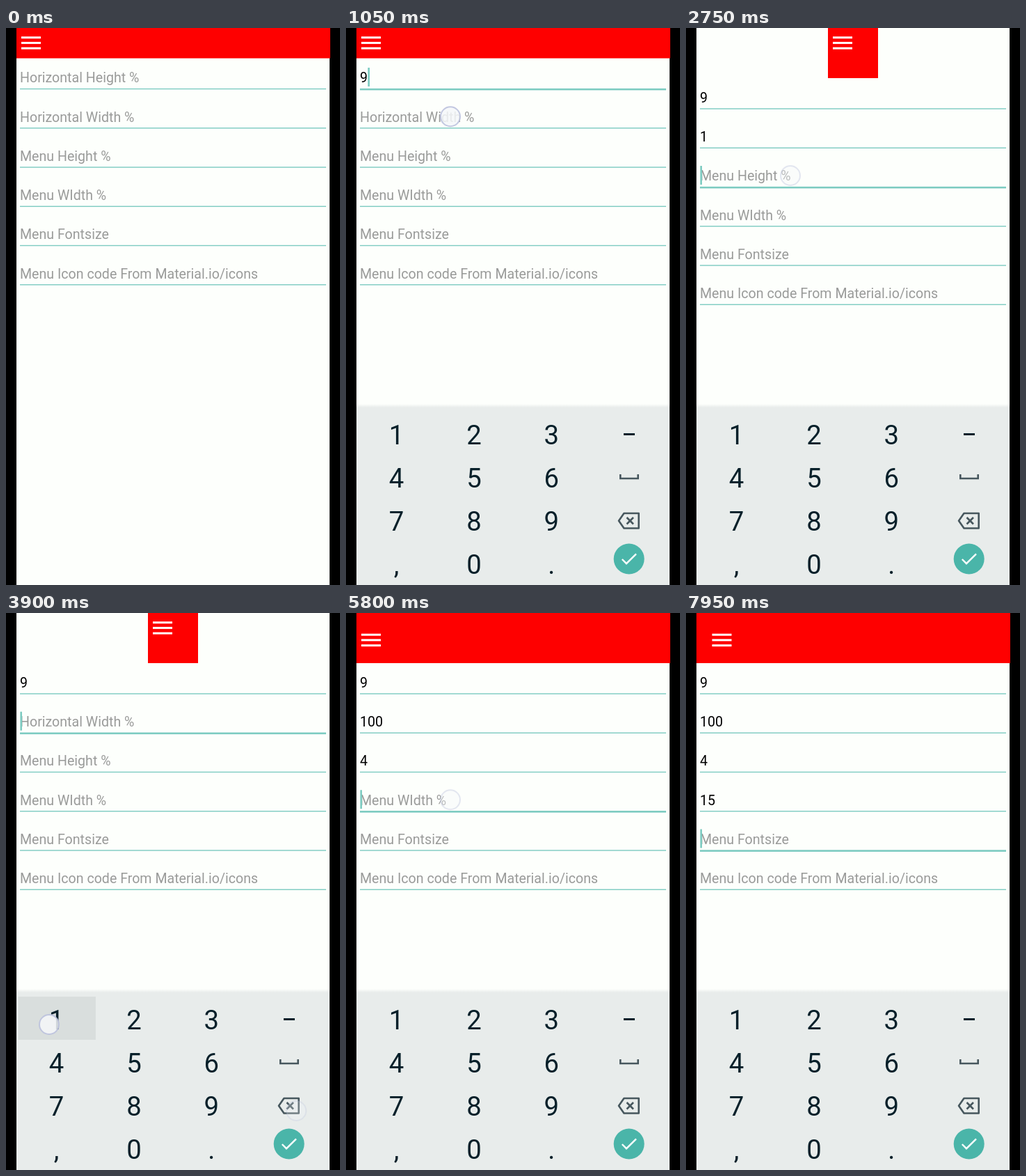
An HTML page with a canvas that plays this animation: 480x800 px, repeating every 8 s.

```html
<!DOCTYPE html>
<html lang="en">
<head>
<meta charset="utf-8">
<title>Menu settings form</title>
<style>
  html, body { margin: 0; width: 100%; height: 100%; overflow: hidden; background: #000; }
  canvas { display: block; }
</style>
</head>
<body>
<canvas id="stage" width="480" height="800"></canvas>
<script>
const ctx = document.getElementById('stage').getContext('2d');
const LOOP = 8000, LEFT = 15, WIDTH = 450, HEIGHT = 800;
const BAR_HEIGHT = 43.5, MIN_BAR_WIDTH = 72;
const ROW_GAP = 56.25, KEY_W = 111.4, KEY_H = 62;
const PRESS = 155, FADE = 100, BLINK = 250, LAYOUT_LAG = 150;
const RED = '#fe0000', PAPER = '#fdfffc', TEAL = '#7ccbc1', INK = '#07202a', KEY_ICON = '#47575e';
const KEYS = '123-456 789⌫,0.✓';

const hints = ['Horizontal Height %', 'Horizontal Width %', 'Menu Height %',
  'Menu WIdth %', 'Menu Fontsize', 'Menu Icon code From Material.io/icons'];

// What the user does: a number focuses that field, a string presses that key
const script = [
  [340, 0], [950, '9'],
  [1095, 1], [2000, '1'],
  [2695, 2],
  [3390, 1], [3830, '⌫'], [3960, '1'], [4060, '0'], [4145, '0'],
  [4345, 2], [5500, '4'],
  [5745, 3], [7160, '1'], [7300, '5'],
  [7445, 4]
];

// Field texts, last non-empty values, focus and last input time
function stateAt(t) {
  const state = { texts: hints.map(() => ''), values: hints.map(() => ''), focus: -1, since: 0 };
  for (const [time, action] of script) {
    if (time > t) break;
    state.since = time;
    if (typeof action === 'number') {
      state.focus = action;
      continue;
    }
    const i = state.focus, text = state.texts[i];
    state.texts[i] = action === '⌫' ? text.slice(0, -1) : text + action;
    state.values[i] = state.texts[i] || state.values[i];
  }
  return state;
}

function rect(color, x, y, w, h) {
  ctx.fillStyle = color;
  ctx.fillRect(x, y, w, h);
}

function stroke(color, width, points, close) {
  ctx.beginPath();
  points.forEach(([x, y]) => ctx.lineTo(x, y));
  if (close) ctx.closePath();
  ctx.strokeStyle = color;
  ctx.lineWidth = width;
  ctx.stroke();
}

function disc(color, x, y, r) {
  ctx.beginPath();
  ctx.arc(x, y, r, 0, 7);
  ctx.fillStyle = color;
  ctx.fill();
}

function keyCell(key) {
  const i = KEYS.indexOf(key), col = i % 4, row = i >> 2;
  return { col, x: 17.5 + col * KEY_W, y: 551 + row * KEY_H };
}

function drawBar([heightPct, widthPct, menuHeight, menuWidth]) {
  const h = heightPct ? HEIGHT * heightPct / 100 : BAR_HEIGHT;
  const w = widthPct ? Math.max(MIN_BAR_WIDTH, WIDTH * widthPct / 100) : WIDTH;
  const x = LEFT + (WIDTH - w) / 2;
  rect(RED, x, 0, w === WIDTH ? w + 1 : w, h);
  const iconX = x + (menuWidth ? 22.5 : 7), iconY = menuHeight ? 29.7 : 12.2;
  for (let i = 0; i < 3; i++) rect('#fff', iconX, iconY + i * 7.7, 28, 3);
  return h > BAR_HEIGHT ? h - BAR_HEIGHT : 0;
}

function drawFields(t, { texts, focus, since }, shift) {
  ctx.font = '19.6px Roboto, sans-serif';
  ctx.textAlign = 'left';
  hints.forEach((hint, i) => {
    const text = texts[i], active = i === focus;
    const line = 86.8 + shift + i * ROW_GAP;
    ctx.fillStyle = text ? '#000' : '#9a9b9a';
    ctx.fillText(text || hint, 20, line - 8.4);
    rect(TEAL, 20, line, 440, active ? 2.6 : 1.4);
    if (active && Math.floor((t - since) / BLINK) % 2 === 0)
      rect(TEAL, 20.4 + ctx.measureText(text).width, line - 29.8, 2.6, 27);
  });
}

function drawKeyboard(t) {
  const u = Math.min(1, Math.max(0, (t - 340) / 330));
  if (!u) return;
  ctx.save();
  ctx.translate(0, 257 * (1 - u) ** 2);
  const edge = ctx.createLinearGradient(0, 540, 0, 545);
  edge.addColorStop(0, PAPER);
  edge.addColorStop(1, '#e8eceb');
  rect(edge, LEFT, 540, WIDTH, 260);

  for (const [time, key] of script) {
    if (typeof key === 'number' || t < time - PRESS || t >= time) continue;
    const { x, y } = keyCell(key);
    rect('#d9dedd', x, y, KEY_W, KEY_H);
  }

  ctx.font = '38.3px Roboto, sans-serif';
  ctx.textAlign = 'center';
  ctx.fillStyle = INK;
  for (const key of '123456789,0.') {
    const { x, y } = keyCell(key);
    ctx.fillText(key, x + KEY_W / 2 - 0.7, y + 46.7);
  }

  rect(INK, 399, 582, 16, 3);
  stroke(KEY_ICON, 2.6, [[394.3, 641], [394.3, 647], [419.7, 647], [419.7, 641]]);
  ctx.lineJoin = 'round';
  stroke(KEY_ICON, 2.6, [[399.5, 697], [420.7, 697], [420.7, 718.5], [399.5, 718.5], [392, 707.7]], true);
  stroke(KEY_ICON, 2.6, [[403.5, 703], [413, 712.5]]);
  stroke(KEY_ICON, 2.6, [[413, 703], [403.5, 712.5]]);
  ctx.lineJoin = 'miter';
  disc('#4ab5a9', 406.7, 762.5, 22);
  stroke('#fff', 2.4, [[396.8, 763], [403, 769.2], [417, 755.4]]);
  ctx.restore();
}

// Fingers land slightly outwards of the key centres
function touchPoint(action, shift) {
  if (typeof action === 'number') return [150, 71 + shift + action * ROW_GAP];
  const { col, x, y } = keyCell(action);
  return [x + KEY_W / 2 + 7 * (col - 1.6), y + KEY_H / 2 + 9];
}

function drawTouches(t, shift) {
  // The first field takes the focus without a visible touch
  for (const [time, action] of script.slice(1)) {
    const alpha = Math.min(1, 1 - (t - time) / FADE);
    if (t < time - PRESS || alpha <= 0) continue;
    ctx.globalAlpha = alpha;
    disc('rgba(244,247,249,.85)', ...touchPoint(action, shift), 14);
    ctx.strokeStyle = 'rgba(184,190,220,.85)';
    ctx.lineWidth = 2;
    ctx.stroke();
    ctx.globalAlpha = 1;
  }
}

function draw(t) {
  rect('#000', 0, 0, 480, HEIGHT);
  rect(PAPER, LEFT, 0, WIDTH, HEIGHT);
  const shift = drawBar(stateAt(t - LAYOUT_LAG).values);
  drawFields(t, stateAt(t), shift);
  drawKeyboard(t);
  drawTouches(t, shift);
}

const startTime = performance.now();
function tick() {
  draw((performance.now() - startTime) % LOOP);
  requestAnimationFrame(tick);
}
tick();
</script>
</body>
</html>
```
